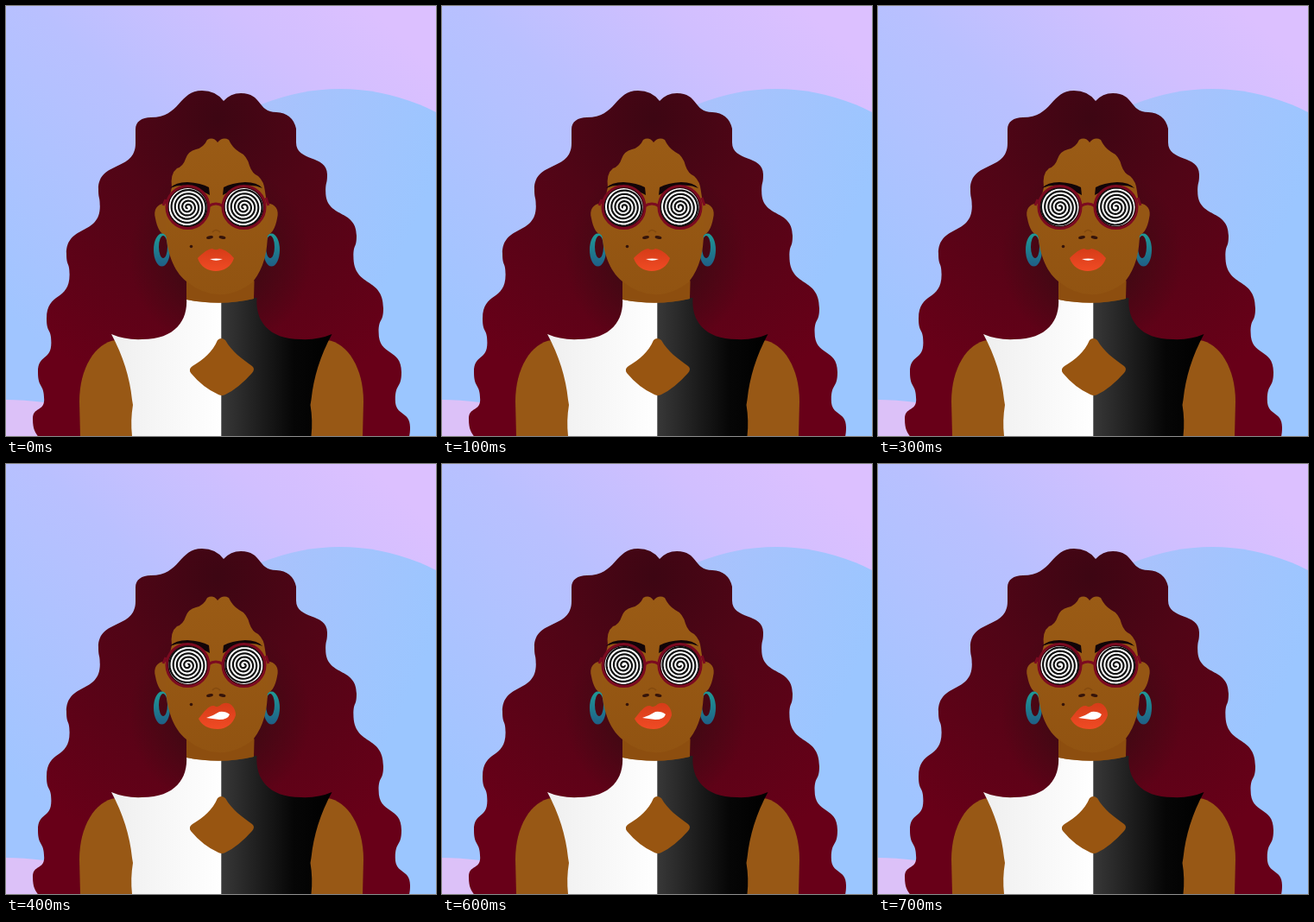
Write an HTML page that moves like this. It is 498 px wide and 498 px high and loops after 800 ms.

```html
<!DOCTYPE html>
<html lang="en">
<head>
<meta charset="utf-8">
<title>Hypnotic glasses</title>
<style>
  html, body { margin: 0; width: 100%; height: 100%; overflow: hidden; background: #b7c1ff; }
  svg { display: block; width: 100vw; height: 100vh; }
</style>
</head>
<body>
<svg viewBox="0 0 498 498">
  <defs>
    <linearGradient id="sky" gradientUnits="userSpaceOnUse" x1="440" y1="20" x2="70" y2="420">
      <stop offset="0" stop-color="#dcc0ff"/>
      <stop offset=".2" stop-color="#d1bfff"/>
      <stop offset=".48" stop-color="#b9c0ff"/>
      <stop offset="1" stop-color="#a0c5ff"/>
    </linearGradient>
    <linearGradient id="disc" gradientUnits="userSpaceOnUse" x1="300" y1="110" x2="498" y2="200">
      <stop offset="0" stop-color="#a9c2fc"/>
      <stop offset="1" stop-color="#9bc6ff"/>
    </linearGradient>
    <radialGradient id="hair" gradientUnits="userSpaceOnUse" cx="245" cy="130" r="330">
      <stop offset="0" stop-color="#3d0613"/>
      <stop offset=".35" stop-color="#500516"/>
      <stop offset="1" stop-color="#680018"/>
    </radialGradient>
    <radialGradient id="shade">
      <stop offset=".4" stop-color="#3a0a12" stop-opacity=".75"/>
      <stop offset="1" stop-color="#3a0a12" stop-opacity="0"/>
    </radialGradient>
    <linearGradient id="white"><stop offset="0" stop-color="#efefef"/><stop offset="1" stop-color="#fff"/></linearGradient>
    <linearGradient id="black"><stop offset="0" stop-color="#000"/><stop offset=".35" stop-color="#060606"/><stop offset="1" stop-color="#383838"/></linearGradient>
    <linearGradient id="skin" x2="0" y2="1"><stop offset="0" stop-color="#9a5b15"/><stop offset="1" stop-color="#915311"/></linearGradient>
    <linearGradient id="teal" x2="0" y2="1"><stop offset="0" stop-color="#1f9a97"/><stop offset="1" stop-color="#1f5f86"/></linearGradient>
    <linearGradient id="lip" x2="0" y2="1"><stop offset="0" stop-color="#d63c18"/><stop offset="1" stop-color="#f04b24"/></linearGradient>
    <clipPath id="rim"><circle r="22.5"/></clipPath>
  </defs>

  <rect width="498" height="498" fill="url(#sky)"/>
  <path d="M0 456Q20 456 44 459V498H0Z" fill="#dcc1f8"/>
  <circle cx="387" cy="337" r="241" fill="url(#disc)"/>
  <path id="mane" fill="url(#hair)"/>
  <ellipse cx="248" cy="290" rx="105" ry="110" fill="url(#shade)"/>

  <path id="arm" d="M127 387C103 390 85 420 85 458L86 498H148V400Z" fill="#985815"/>
  <path id="dress" d="M209 338C211 364 196 386 158 386Q138 387 122 380Q142 417 146 456L147 462Q144 480 146 498H250.200V340Z" fill="url(#white)"/>
  <path d="M245 387Q249 383 254 387C262 401 273 408 285 417Q289 420 285 425Q269 443 254 450Q250 452 246 450Q228 442 214 425Q211 420 216 417C229 409 239 401 245 387Z" fill="#985511"/>

  <path id="ear" d="M188 229C176 227 170 235 173 246C175 257 179 266 190 268Z" fill="#955614"/>
  <path id="ring" fill="url(#teal)" fill-rule="evenodd"
    d="M171 282.500a9.500 19 0 1 0 19 0a9.500 19 0 1 0 -19 0ZM177 279a5 13 0 1 0 10 0a5 13 0 1 0 -10 0Z"/>
  <path fill="url(#skin)" d="M245 158Q240 151 233 155Q229 164 220 166Q211 168 208 177Q205 186 198 188Q190 194 192 210
    L185 240V262C187 285 193 306 209 319V340Q249 348 287 339V318C298 304 303 285 303 262V235L300 215Q299 203 292 197
    Q285 194 282 185Q279 173 270 169Q262 164 258 155Q251 151 245 158Z"/>
  <path d="M209 319Q248 350 288 318L287 339Q249 348 209 340Z" fill="#8a4c0e" opacity=".6"/>

  <path id="brow" d="M190 211Q196 204 210 204Q226 205 235 210L236 219Q222 211 208 208Q199 207 190 211Z" fill="#120508"/>
  <g id="glasses" fill="none" stroke="#7b0a20" stroke-width="3">
    <path d="M234.500 232Q243 226 251.500 232M185 224L182 231M301 222L304 231"/>
  </g>

  <path d="M239 262Q243 257 248 262" fill="none" stroke="#7a430c" stroke-width="1.500" opacity=".6"/>
  <ellipse id="nostril" cx="236" cy="268" rx="4" ry="1.800" transform="rotate(-12 236 268)" fill="#35140a"/>
  <circle cx="214.500" cy="278.500" r="1.800" fill="#35140a"/>

  <g id="calm">
    <path d="M222 292C228 286 234 281 239 281Q243 283.500 247 281C254 282 260 287 264 292C261 302 252 307 243 307C234 307 225 302 222 292Z" fill="url(#lip)"/>
    <path d="M236 293Q243 292 251 293Q243 296.500 236 293Z" fill="#fff"/>
  </g>
  <g id="snarl">
    <path d="M223 295C230 286 235 279 241 280Q245 283 250 278Q256 275 261 279Q266 284 266 291C263 301 255 307 245 307Q229 307 223 295Z" fill="url(#lip)"/>
    <path d="M232 294Q241 291 247 287Q254 286 259 290Q257 296 247 296Q239 295 232 294Z" fill="#fff"/>
  </g>
</svg>
<script>
const NS = 'http://www.w3.org/2000/svg';
const LOOP = 800, STEP = 100, SNARL_AT = 400;
const $ = id => document.getElementById(id);

function add(parent, tag, attrs) {
  const el = document.createElementNS(NS, tag);
  for (const k in attrs) el.setAttribute(k, attrs[k]);
  return parent.appendChild(el);
}

// Copies a part to the other side of a vertical axis.
function mirror(id, axis, fill) {
  const el = $(id), copy = el.cloneNode(true);
  copy.removeAttribute('id');
  const own = el.getAttribute('transform') || '';
  copy.setAttribute('transform', `matrix(-1 0 0 1 ${2 * axis} 0) ${own}`);
  if (fill) copy.setAttribute('fill', fill);
  el.after(copy);
}
mirror('arm', 249.5);
mirror('dress', 249.75, 'url(#black)');
mirror('ear', 243.5);
mirror('ring', 244);
mirror('brow', 243.5);
mirror('nostril', 243.25);

// Joins two points by an S that leaves and arrives vertically.
function wave([x, y], [u, v]) {
  const k = (v - y) * 0.62;
  return `C${x} ${y + k} ${u} ${v - k} ${u} ${v}`;
}

// Each curl swings out to a crest, then dips in a little deeper than the one above.
function curls(crests, side) {
  return crests.flatMap(([x, y], i) => [[x, y], [x - side * 1.8 * i, y + 16 + 4 * i]]);
}
const trace = pts => pts.slice(1).map((p, i) => wave(pts[i], p)).join('');

const left = curls([[150, 143], [107, 212], [70, 287], [47, 362], [37, 424], [31, 478]], -1).reverse();
const right = curls([[336, 142], [372, 195], [406, 266], [437, 350], [458, 424], [468, 488]], 1);
$('mane').setAttribute('d', 'M' + left[0] + trace(left) +
  'C150 134 157 129 168 129C202 129 200 98 227 98Q243 98 252 110' +
  'Q260 101 272 101C297 101 291 123 313 123Q332 124 336 142' + trace(right) + 'Z');

// Spiral with evenly spaced turns and a light centre.
function spiral(pitch, turns) {
  let d = '';
  for (let a = 0.25; a <= turns; a += 1 / 48) {
    const t = a * 2 * Math.PI, r = pitch * a;
    d += `${d ? 'L' : 'M'}${(r * Math.cos(t)).toFixed(2)} ${(r * Math.sin(t)).toFixed(2)}`;
  }
  return d;
}

const swirl = spiral(4.2, 6);
const lenses = [210.5, 275.5].map(x => {
  const g = add($('glasses'), 'g', { transform: `translate(${x} 233)` });
  add(g, 'circle', { r: 24.5, fill: '#26060c' });
  add(g, 'circle', { r: 22, fill: '#fff', stroke: 'none' });
  const clip = add(g, 'g', { 'clip-path': 'url(#rim)' });
  return add(clip, 'path', { d: swirl, stroke: '#111', 'stroke-width': 2.2 });
});

function draw(now) {
  const t = Math.floor((now % LOOP) / STEP) * STEP;
  for (const lens of lenses) lens.setAttribute('transform', `rotate(${t / LOOP * 360})`);
  const open = t >= SNARL_AT;
  $('calm').style.display = open ? 'none' : '';
  $('snarl').style.display = open ? '' : 'none';
}

const start = performance.now();
function tick() {
  draw(performance.now() - start);
  requestAnimationFrame(tick);
}
tick();
</script>
</body>
</html>
```
